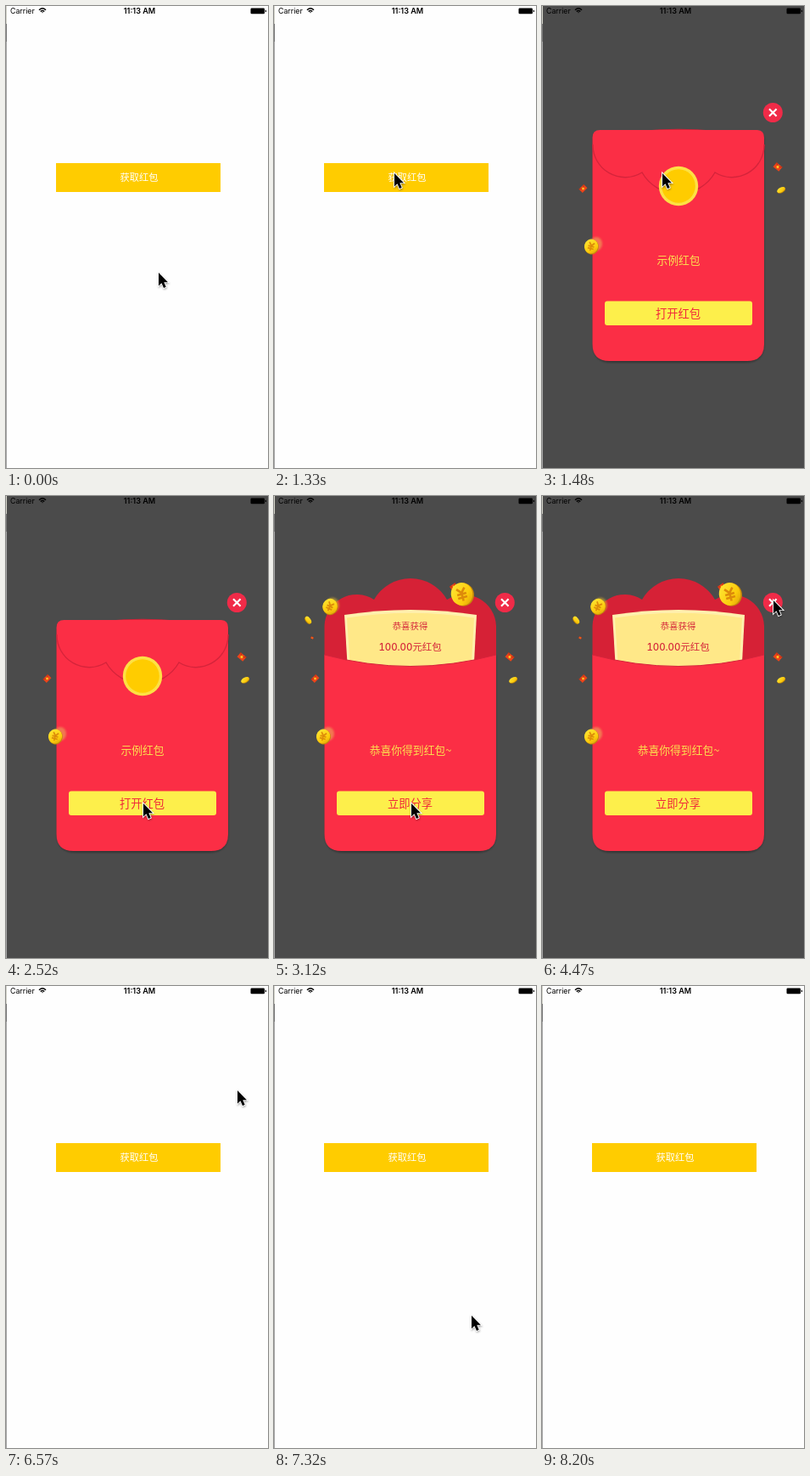
An HTML page for the animation above (8300 ms loop, 309x544 px).

```html
<!DOCTYPE html>
<html lang="zh-CN">
<head>
<meta charset="utf-8">
<title>红包</title>
<style>
  html, body { margin: 0; width: 100%; height: 100%; overflow: hidden; background: #fefefe; }
  svg { display: block; width: 100%; height: 100%; }
  text { font-family: "Noto Sans CJK SC", "Noto Sans CJK", sans-serif; text-anchor: middle; }
  .status { font-family: Inter, Roboto, sans-serif; font-size: 8.8px; }
  .amount { font-family: Inter, "Noto Sans CJK SC", "Noto Sans CJK", sans-serif; font-variant-numeric: tabular-nums; }
</style>
</head>
<body>
<svg viewBox="0 0 309 544">
  <defs>
    <linearGradient id="gold" x2="1" y2="1">
      <stop offset="0" stop-color="#ffe93a"/>
      <stop offset=".65" stop-color="#fccb0c"/>
      <stop offset="1" stop-color="#d99a08"/>
    </linearGradient>
    <filter id="soft" x="-50%" y="-50%" width="200%" height="200%"><feGaussianBlur stdDeviation="1.3"/></filter>
    <g id="coin">
      <ellipse cx="1" cy=".6" rx="9.3" ry="10" fill="#c58a0a"/>
      <ellipse rx="9.2" ry="9.8" fill="url(#gold)"/>
      <path d="M-3.5-5 0-1 3.5-5M0-1V6M-4 0H4M-4 3H4" fill="none" stroke="#dd8b0a" stroke-width="1.9"/>
    </g>
    <g id="packet">
      <path d="M-4-3H4V3H-4Z" fill="#ed4419"/>
      <path d="M-4-3 0 0 4-3" fill="none" stroke="#b82d14" stroke-width=".8"/>
      <circle r="1.4" fill="#ffc322"/>
    </g>
    <g id="chip">
      <ellipse cy=".8" rx="5.2" ry="2.9" fill="#b98408"/>
      <ellipse rx="5.2" ry="2.8" fill="url(#gold)"/>
    </g>
  </defs>

  <rect width="309" height="544" fill="#fefefe"/>
  <rect x="59" y="185" width="194" height="34" fill="#fc0"/>
  <text x="157" y="206" font-size="11.2" font-weight="300" fill="#fff">获取红包</text>

  <g id="popup">
    <rect width="309" height="544" fill="#4b4b4b"/>

    <g id="closed">
      <path d="M60 158Q60 148 70 148H252Q262 148 262 158V398Q262 420 240 420H82Q60 420 60 398Z" fill="#000" opacity=".3" filter="url(#soft)"/>
      <path d="M117 147Q161 142.500 205 147Z" fill="#cf2439"/>
      <path d="M59.500 155Q59.500 146 68.500 146H253Q262 146 262 155V398Q262 418 242 418H79.500Q59.500 418 59.500 398Z" fill="#fb2e45"/>
      <path d="M60 163A38 38 0 0 0 118 196A49.500 49.500 0 0 0 204 196A38 38 0 0 0 262 163" fill="none" stroke="#d5243b" stroke-width="1.4"/>
      <circle cx="161" cy="212" r="23.200" fill="#fde144"/>
      <circle cx="161" cy="212" r="19.800" fill="#fc0"/>
      <text x="161" y="303.800" font-size="12.8" fill="#fbe14f">示例红包</text>
    </g>

    <g id="opened">
      <path d="M60 188V398Q60 420 82 420H240Q262 420 262 398V188Z" fill="#000" opacity=".3" filter="url(#soft)"/>
      <use href="#packet" transform="translate(212 107) rotate(-35)"/>
      <path d="M59.500 153A38 38 0 0 1 118 122A49.500 49.500 0 0 1 204 122A38 38 0 0 1 262 153V205H59.500Z" fill="#d62136"/>
      <path d="M83 140Q161 128 239 140L235.500 205H87Z" fill="#fff0ae"/>
      <path d="M86 143.500Q161 132 236 143.500L232.500 205H90Z" fill="#ffe888"/>
      <path d="M59.500 187Q161 214 262 187V398Q262 418 242 418H79.500Q59.500 418 59.500 398Z" fill="#fb2e45"/>
      <path d="M59.500 187Q161 214 262 187" fill="none" stroke="#d5243b"/>
      <text x="160.500" y="157" font-size="10.4" font-weight="500" fill="#d5283b">恭喜获得</text>
      <text class="amount" x="160.500" y="182" font-size="11.4" font-weight="500" fill="#d5283b">100.00元红包</text>
      <text x="161" y="303.800" font-size="12.8" fill="#fbe14f">恭喜你得到红包~</text>
      <ellipse cx="69" cy="128.500" rx="8" ry="9" fill="#d4ad32" opacity=".6" filter="url(#soft)"/>
      <use href="#coin" transform="translate(66 130) rotate(25) scale(.94)"/>
      <use href="#coin" transform="translate(221.500 115.500) rotate(-15) scale(1.38)"/>
      <use href="#chip" transform="translate(40.500 146) rotate(55) scale(.95)"/>
      <use href="#packet" transform="translate(45 167) rotate(30) scale(.4)"/>
    </g>

    <rect x="74" y="347.500" width="174" height="28.500" rx="3" fill="#fdef4b"/>
    <text id="action" x="160.500" y="367" font-size="13.3" fill="#f0283a"></text>
    <ellipse cx="64" cy="280" rx="7" ry="8" fill="#f08a55" opacity=".8" filter="url(#soft)"/>
    <use href="#coin" transform="translate(58 283) rotate(15) scale(.88)"/>
    <use href="#packet" transform="translate(48.500 215) rotate(-45)"/>
    <use href="#packet" transform="translate(278 189.500) rotate(40) scale(1.1)"/>
    <use href="#chip" transform="translate(282 216.500) rotate(-28)"/>
    <circle cx="272.300" cy="125.500" r="11.500" fill="#f02b48"/>
    <path d="M268 121.200l8.600 8.600m0-8.600l-8.600 8.600" stroke="#fff" stroke-width="2.200"/>
  </g>

  <text class="status" x="5" y="9" style="text-anchor:start">Carrier</text>
  <text class="status" x="157.500" y="9" style="font-weight:600;font-size:9.1px">11:13 AM</text>
  <g fill="none" stroke="#000" stroke-width="1.400">
    <path d="M39 4.700Q43 1 47 4.700M40.700 6.500Q43 4.400 45.300 6.500"/>
    <path d="M42 7.300H44L43 8.600Z" fill="#000" stroke="none"/>
  </g>
  <rect x="288.500" y="2.500" width="16.500" height="6.700" rx="1.200"/>
  <rect x="305.800" y="4.700" width="1.200" height="2.300" rx=".5"/>

  <rect width="1" height="21" fill="#d2d2c8"/>
  <rect y="21" width="1" height="21" fill="#777"/>
  <rect y="42" width="1" height="502" fill="#a6a6a6"/>

  <g id="pointer">
    <path d="M0 0V15.500L3.500 12.200 6 18 8.700 16.800 6.300 11.200H11Z" transform="translate(.5 1.300)" opacity=".35" stroke="#000" stroke-width="1.500" filter="url(#soft)"/>
    <path d="M0 0V15.500L3.500 12.200 6 18 8.700 16.800 6.300 11.200H11Z" stroke="#fff" stroke-width="1.800" paint-order="stroke"/>
  </g>
</svg>
<script>
  const LOOP = 8300, POPUP_AT = 1480, OPEN_AT = 3120, CLOSE_AT = 6570;
  const START = [180, 314];
  const moves = [
    { from: 150, until: 730, steps: 5, to: [142, 197] },
    { from: 1780, until: 2520, steps: 6, to: [162, 362] },
    { from: 3570, until: 4470, steps: 7, to: [273, 123] },
    { from: 6870, until: 7760, steps: 7, to: [207, 560] }
  ];
  const $ = id => document.getElementById(id);
  const show = (id, on) => $(id).setAttribute('display', on ? 'inline' : 'none');
  const ease = p => p * p * (3 - 2 * p);

  // The pointer advances in discrete samples, eased over each move.
  function pointerAt(t) {
    let position = START;
    for (const { from, until, steps, to } of moves) {
      if (t < from) break;
      const sample = Math.floor((t - from) / (until - from) * (steps - 1) + 1e-6) + 1;
      const p = ease(Math.min(sample / steps, 1));
      position = position.map((v, i) => v + (to[i] - v) * p);
    }
    return position;
  }

  function draw(t) {
    const opened = t >= OPEN_AT;
    show('popup', t >= POPUP_AT && t < CLOSE_AT);
    show('closed', !opened);
    show('opened', opened);
    $('action').textContent = opened ? '立即分享' : '打开红包';
    $('pointer').setAttribute('transform', `translate(${pointerAt(t)})`);
  }

  const start = performance.now();
  function tick() {
    draw((performance.now() - start) % LOOP);
    requestAnimationFrame(tick);
  }
  tick();
</script>
</body>
</html>
```
